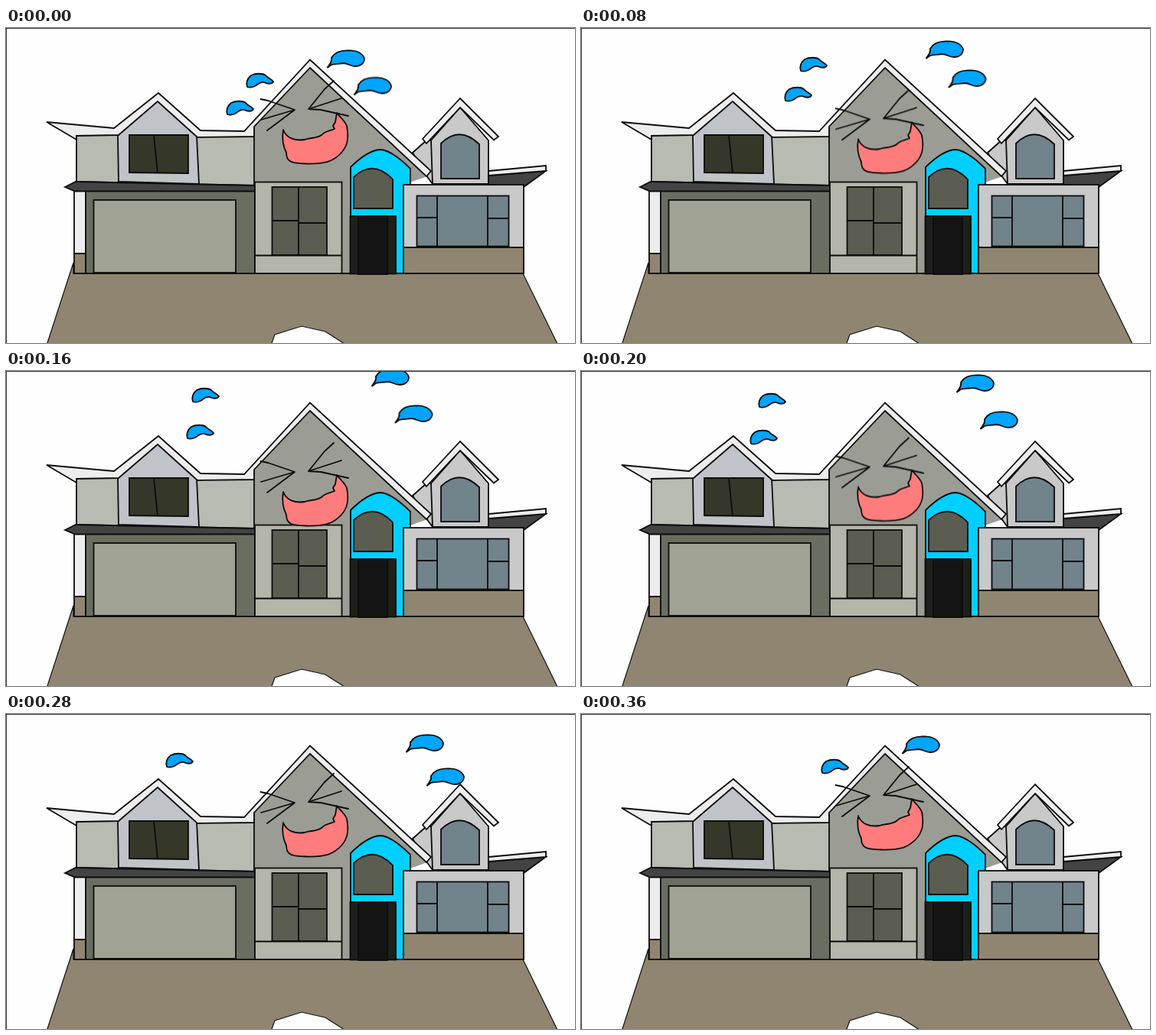
An HTML page that plays this animation: 743x412 px, repeating every 0.4 s.

```html
<!DOCTYPE html>
<html lang="en">
<head>
<meta charset="utf-8">
<title>Laughing house</title>
<style>
html, body { margin: 0; width: 100%; height: 100%; overflow: hidden; background: #fefefe; }
svg { display: block; width: 743px; height: 412px; }
.house, .face, .drop { stroke: #0c0c0c; stroke-width: 1.8; stroke-linejoin: miter; }
.line { fill: none; }
.ground { fill: #8f8570; }
.trim { fill: #eeeded; }
.siding { fill: #b7bbb2; }
.wall { fill: #9b9c94; }
.stone { fill: #c9c9c9; }
.shingle { fill: #444343; }
.pane { fill: #5b5d51; }
.glass { fill: #71838b; }
.drop { fill: #00a5ff; }
.face { fill: none; stroke-linecap: round; stroke-linejoin: round; }
.mouth { fill: #ff7c7c; }

.face, .drop { animation: 400ms step-end infinite; }
.face { animation-name: laugh; }
.a { animation-name: a; }
.b { animation-name: b; }
.c { animation-name: c; }
.d { animation-name: d; }

@keyframes laugh {
  0%, 90%, 100% { transform: translateY(0); }
  10%, 80% { transform: translateY(6px); }
  20%, 60% { transform: translateY(12.3px); }
  30%, 50% { transform: translateY(18.5px); }
  40% { transform: translateY(25px); }
  70% { transform: translateY(9px); }
}
@keyframes a {
  0%, 90%, 100% { transform: translate(-26px, 36px); }
  10% { transform: translate(-35px, 26.5px); }
  20% { transform: translate(-48px, 18px); }
  30% { transform: translate(-63px, 14px); }
  40% { transform: translate(-78px, 11px); }
  50% { transform: translate(-93px, 18px); }
  60% { transform: translate(-26px, 36px); opacity: 0; }
  80% { transform: translate(-26px, 36px); opacity: 0; }
}
@keyframes b {
  0%, 90%, 100% { transform: none; }
  10% { transform: translate(-15.5px, -11.5px); }
  20% { transform: translate(-28px, -21px); }
  30% { transform: translate(-49px, -29px); }
  40% { transform: translate(-71px, -37px); }
  50% { transform: translate(-82px, -30px); }
  60% { transform: translate(-93px, -22px); }
  70% { transform: translate(-105px, -8px); }
  80% { transform: translate(-118px, 8px); }
}
@keyframes c {
  0%, 90%, 100% { transform: none; }
  10% { transform: translate(10.5px, -8px); }
  20% { transform: translate(31px, -12px); }
  30% { transform: translate(44px, -22px); }
  40% { transform: translate(58px, -32px); }
  50% { transform: translate(71px, -24px); }
  60% { transform: translate(84px, -15px); }
  70% { transform: translate(103px, -2px); }
  80% { transform: translate(122px, 12px); }
}
@keyframes d {
  0%, 90%, 100% { transform: translate(35px, 35.5px); }
  10% { transform: translate(45.5px, 29.5px); }
  20% { transform: translate(60.5px, 26px); }
  30% { transform: translate(74px, 21px); }
  40% { transform: translate(88.5px, 16px); }
  50% { transform: translate(102px, 24px); }
  60% { transform: translate(116px, 32px); }
  70% { transform: translate(130px, 42px); }
  80% { transform: translate(35px, 35.5px); opacity: 0; }
}
</style>
</head>
<body>
<svg viewBox="0 0 743 412">
  <defs>
    <path id="small" d="M315 77C313 72 315 66 320 62C326 59 335 59 339 62C342 66 346 66 349 70C347 74 341 73 337 71C331 70 329 74 325 76C321 78 318 78 315 77Z"/>
    <path id="big" d="M419.5 52C423 47 426 44 425 39C429 32 438 29 448 29.5C458 29 466 33 468 40C468 46 463 50 456 50C449 50 447 46 440 46C433 47 429 47 425 48Z"/>
  </defs>

  <path class="ground" stroke="#111" stroke-width="1.2" d="M88 307L53 415H721L675 321H88Z"/>
  <path fill="#fefefe" stroke="#111" stroke-width="1.2" d="M346 415L351 401L386 390L417 397L445 415Z"/>

  <g class="house">
    <!-- left wing -->
    <path class="siding" d="M92 140H325V206L92 201Z"/>
    <path fill="#c0c4c9" d="M146 140L198 95L249 141L252 204L147 201Z"/>
    <path fill="#353828" d="M161 140H238V190L161 189Z"/>
    <path class="line" d="M193 140L198 190"/>

    <!-- right dormer -->
    <path class="stone" d="M531 163L549 147L557 147V204L549 193Z"/>
    <path class="stone" d="M555 147L593 104L630 147V204H557Z"/>
    <path class="trim" d="M544 145L593 92L643 142L637 146.500L593 104L549 151Z"/>
    <path class="glass" d="M568 197V151Q592 127 618 152V197Z"/>
    <path class="shingle" d="M630 193L705 187L676 208L630 205Z"/>
    <path class="trim" d="M630 187L705 180V187L630 193Z"/>

    <!-- centre gable -->
    <path class="wall" stroke="none" d="M324 129L397 52L550 194L519 205V321H324Z"/>
    <path class="line" d="M324 129V206M439 321H450"/>
    <path class="trim" d="M53 123L141 131L199 85L254 134L311 135L397 41.500L555 187L549 194L397 52L324 129V142L250 143L198 96L147 140L92 141V146Z"/>

    <!-- garage -->
    <rect fill="#6a6e61" x="104" y="213" width="221" height="108"/>
    <rect fill="#a0a294" x="114.500" y="225" width="185.500" height="95"/>
    <rect class="trim" x="89" y="213" width="15" height="82"/>
    <rect class="ground" x="89" y="295" width="15" height="26"/>
    <path class="shingle" d="M77 208L91 201L325 206V213.500H90Z"/>

    <!-- centre window -->
    <rect fill="#b3b6a9" x="325" y="201.500" width="113.500" height="119.500"/>
    <path class="line" d="M325 297.500H438"/>
    <rect class="pane" x="347.500" y="208" width="71.500" height="89"/>
    <path class="line" d="M382 208V297M347 252H382M382 255H419"/>

    <!-- entrance -->
    <path fill="#00cfff" d="M450 321V182Q472 160 489 159Q504 160 528 184V321Z"/>
    <path class="pane" d="M454 236V195Q480 171 505 198V236Z"/>
    <rect fill="#1c2018" x="449.500" y="246" width="59.500" height="75.500"/>
    <rect fill="#141414" x="460" y="246" width="38" height="76"/>

    <!-- right wing -->
    <rect class="stone" x="519" y="205" width="157" height="82"/>
    <rect class="ground" x="519" y="287" width="157" height="34"/>
    <rect class="glass" x="536.500" y="219.500" width="120" height="66"/>
    <path class="line" d="M563 219V286M629 219V286M536 248H563M629 249H657"/>
  </g>

  <g class="face">
    <path d="M332.500 93L342 95L377 107L333 120M377 107L341 134"/>
    <path d="M428 69L416 80L395 106L438 92M395 106L411 107L447 115"/>
    <path class="mouth" d="M362 133C360 145 362 155 366 163C366 176 374 177 392 177.500C418 178 428 174 438 163C446 154 448 144 445 128C441 119 435 116 432 111L430 123L427 128L429 132C423 135 418 134 412 140C405 145 398 143 390 146C377 148 366 144 362 133Z"/>
  </g>

  <use href="#small" class="drop a"/>
  <use href="#small" class="drop b"/>
  <use href="#big" class="drop c"/>
  <use href="#big" class="drop d"/>

  <path fill="#333" d="M0 0H743V1H1V412H0Z"/>
</svg>
</body>
</html>
```
